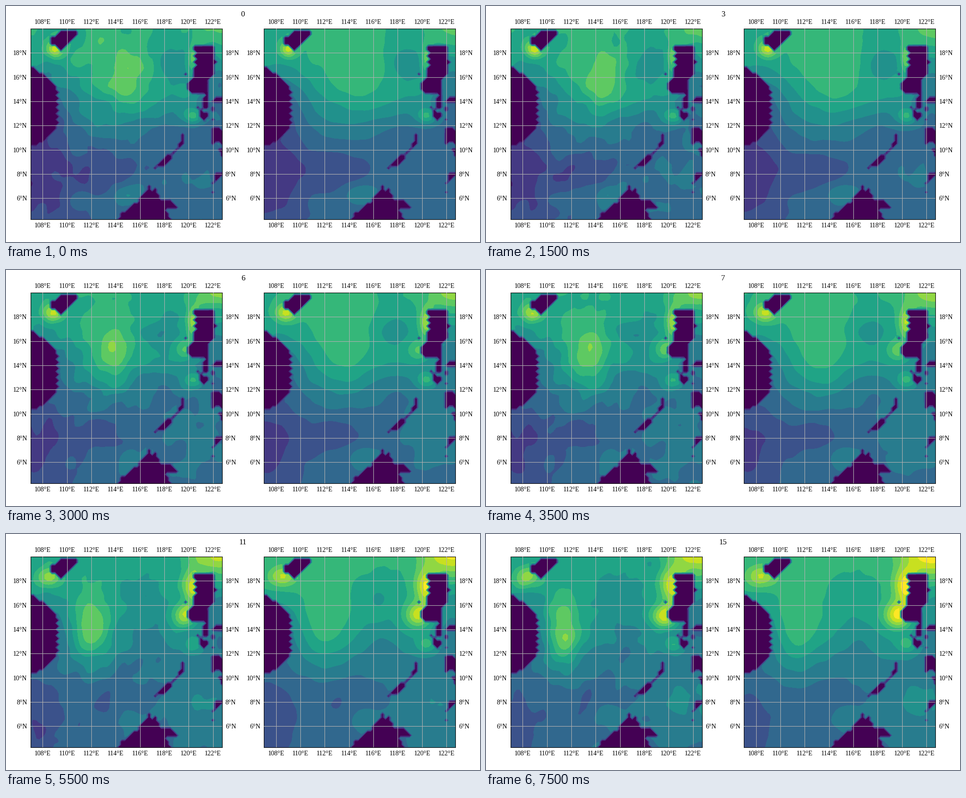
These frames come from a looping animation (1000 px wide and 500 px high, 8000 ms). A matplotlib script:

```python
import numpy as np
import matplotlib.pyplot as plt
from matplotlib.animation import FuncAnimation
from matplotlib.path import Path

plt.rcParams["font.family"] = "Liberation Serif"

W, H, DPI = 1000, 500, 100
STEPS = 16
CELL = 0.25

lon = np.arange(107, 122.8, CELL)
lat = np.arange(4.25, 20.1, CELL)
X, Y = np.meshgrid(lon, lat)


def teeth(x, top, n):
    """Sawtooth coast running south, one grid row per point."""
    return [(x + CELL * (k % 2), top - CELL * k) for k in range(n)]


# Corners of each coast as (lon, lat)
WEST = [(106.9, 16.9), (108, 16.25), (109, 15.25), *teeth(109, 15, 13),
        (109, 11.75), (108, 10.75), (107.5, 10.5), (106.9, 10.5)]
NORTH = [(109.5, 19.75), (110.75, 19.75), (110.75, 19.5), (110.25, 19),
         (110, 18.75), (109.5, 18.25), (109, 18.75), (108.75, 18.75),
         (108.75, 19.25), (109, 19.25)]
EAST = [(120.5, 18.5), (122, 18.5), (122, 17.5), (122.25, 17.25), (122, 17),
        (122, 16.25), (121.5, 15.75), (121.5, 13.5), (121.25, 13.5),
        (121.25, 14.25), (121, 14.75), (120.25, 14.75), (120, 15),
        (120, 15.5), (120.5, 16), *teeth(120.5, 18.25, 7)[::-1]]
SOUTH = [(114.25, 4.25), (114.5, 4.75), (115, 5), (115.5, 5.5), (116, 5.5),
         (116, 6), (116.5, 6.5), (116.75, 7), (117, 6.5), (117.25, 6.75),
         (117.75, 5.75), (118.5, 5.75), (119, 5.25), (118, 5.25),
         (118.5, 4.25)]
SMALL = [
    [(120.75, 13.5), (121.5, 13), (121.5, 12.75), (121.25, 12.5), (121, 12.75)],
    [(122, 14), (122.25, 14.25), (122.75, 14.25), (122.75, 14)],
    [(122, 11.75), (122.5, 11.75), (122.75, 11.5), (122.75, 10.5),
     (122.25, 10.75), (122, 10.5)],
    [(122.5, 10), (122.75, 10), (122.75, 9.5)],
    [(122.25, 8), (122.75, 8), (122.25, 7.5)],
    [(118.25, 9.5), (118.5, 9.5), (118.5, 9.25), (118, 8.75), (117.5, 8.75)],
    # chains and single islets
    [(119.5, 11.25), (119.5, 10.5)], [(119.5, 10.5), (118.5, 9.5)],
    [(119.25, 10.5), (119.25, 10.25)], [(117.5, 8.75), (117.25, 8.5)],
    [(122, 13.5), (122, 13.25)], [(122.25, 7.5), (122, 7.25)],
    [(119.75, 16.25)], [(122, 12.5)], [(122, 6.5)],
]
LAKE = (121.25, 14.5)


def near(a, b, reach=0.06):
    """Grid nodes lying on the segment a-b."""
    (ax, ay), (bx, by) = a, b
    dx, dy = bx - ax, by - ay
    s = ((X - ax) * dx + (Y - ay) * dy) / (dx * dx + dy * dy + 1e-9)
    s = np.clip(s, 0, 1)
    return np.hypot(X - ax - s * dx, Y - ay - s * dy) < reach


def land_mask():
    nodes = np.c_[X.ravel(), Y.ravel()]
    mask = np.zeros(X.shape, bool)
    for coast in [WEST, NORTH, EAST, SOUTH, *SMALL]:
        if len(coast) > 2:
            inside = Path(coast + coast[:1]).contains_points(nodes)
            mask |= inside.reshape(X.shape)
        for a, b in zip(coast, coast[1:] + coast[:1]):
            mask |= near(a, b)
    return mask & ~near(LAKE, LAKE)


LAND = land_mask()

# Bumps drift from a first to a last state: (lon, lat, width, height, strength)
CORE = (115, 15.7, 1.2, 1.6, 2.1), (111.4, 13.6, 0.95, 2.1, 3.5)
BUMPS = [
    # warm spots by the coasts
    ((109, 18.3, .45, .45, 3.8), (108.4, 18.4, .9, .65, 3)),
    ((120.4, 17.5, .3, .8, 2.6), (120.4, 17.5, .7, 1, 5)),
    ((119.8, 15.2, .6, .5, .5), (119.7, 15.2, .75, .75, 5)),
    ((120.4, 12.8, .55, .45, 2.8), (120.4, 12.8, .6, .5, 2.2)),
    ((122.8, 20.3, 1.4, 1.2, 2), (122.5, 20.3, 1.8, 1.3, 5)),
    ((115, 6.4, 1, .6, 1.6), (115.3, 6.8, 1, .8, 1)),
    # broad warm water
    ((113, 18.5, 3, 2.5, .7), (112, 19, 2.5, 2, .2)),
    ((121, 7.5, 2.5, 2, .3), (121.5, 7.8, 2.2, 2, 1.2)),
    # cool eddy, tongue, basins and coastal strips
    ((118.7, 17.2, .9, .9, -1.7), (115.8, 16.6, 1.4, 1.2, -.8)),
    ((118.5, 11.5, 2, 1.2, -.8), (116.3, 13.2, 1, 1.5, -.9)),
    ((107.3, 8.5, 2.2, 4, -2.4), (107, 6, 2, 3, -1.6)),
    ((113, 8.4, 2.3, 1.2, -1.4), (113.5, 8, 2, 1.5, -.9)),
    ((122.6, 14.8, 1.6, 2.2, -2.1), (122.6, 14.8, 1.6, 2.2, -1.6)),
    ((108.6, 14.2, 1.6, 1.8, -2), (108.2, 14.2, 1.3, 1.8, -1.6)),
]

rng = np.random.default_rng(7)
WAVES = rng.uniform((0.9, 0, 0, -.5), (3.2, 2 * np.pi, 2 * np.pi, .5), (30, 4))


def ripple(t):
    z = 0
    for size, angle, phase, speed in WAVES:
        along = X * np.cos(angle) + Y * np.sin(angle)
        z = z + size * np.sin(2 * np.pi * along / size + phase + speed * t)
    return z / 8.5


def bump(e, first, last, spread=1):
    x, y, w, h, a = (p + (q - p) * e for p, q in zip(first, last))
    r2 = ((X - x) / w) ** 2 + ((Y - y) / h) ** 2
    return a * np.exp(-r2 / (2 * spread ** 2))


def field(t, core, spread, fade, rough):
    u = t / (STEPS - 1)
    e = u * u * (3 - 2 * u)
    front = 1 / (1 + np.exp((12.5 - Y) / 1.3))  # cool south to warm north
    z = 4.5 + 0.4 * e + (3.2 - fade * e) * front
    z += core * bump(e, *CORE, spread) + sum(bump(e, *b) for b in BUMPS)
    z = np.clip(z + rough * ripple(t), 1.1, 12.9)
    z[LAND] = 0
    return z


fig = plt.figure(figsize=(W / DPI, H / DPI), dpi=DPI, facecolor="white")
title = fig.suptitle("0", y=0.98, fontsize=12)


def make_map(left):
    ax = fig.add_axes([left / W, 47.8 / H, 404.3 / W, 404.1 / H])
    ax.set(xlim=(107, 122.75), ylim=(4.25, 20))
    east, north = range(108, 123, 2), range(6, 19, 2)
    ax.set_xticks(east, [f"{v}°E" for v in east])
    ax.set_yticks(north, [f"{v}°N" for v in north])
    ax.tick_params(length=0, pad=5, labelsize=10,
                   labeltop=True, labelright=True)
    ax.set_axisbelow(False)
    ax.grid(color="#b0b0b0", lw=0.8)
    return ax


PANELS = [
    (make_map(51.65), dict(core=1, spread=1, fade=0.9, rough=0.2)),
    (make_map(544), dict(core=0.42, spread=1.25, fade=0, rough=0.05)),
]
drawn = []


def draw(t):
    while drawn:
        drawn.pop().remove()
    for ax, style in PANELS:
        drawn.append(ax.contourf(lon, lat, field(t, **style), cmap="viridis",
                                 levels=np.arange(14), vmin=0.5, vmax=12.5))
    title.set_text(str(t))
    return drawn


anim = FuncAnimation(fig, draw, frames=STEPS, interval=500,
                     repeat=True, repeat_delay=0, blit=False)
plt.show()
```
